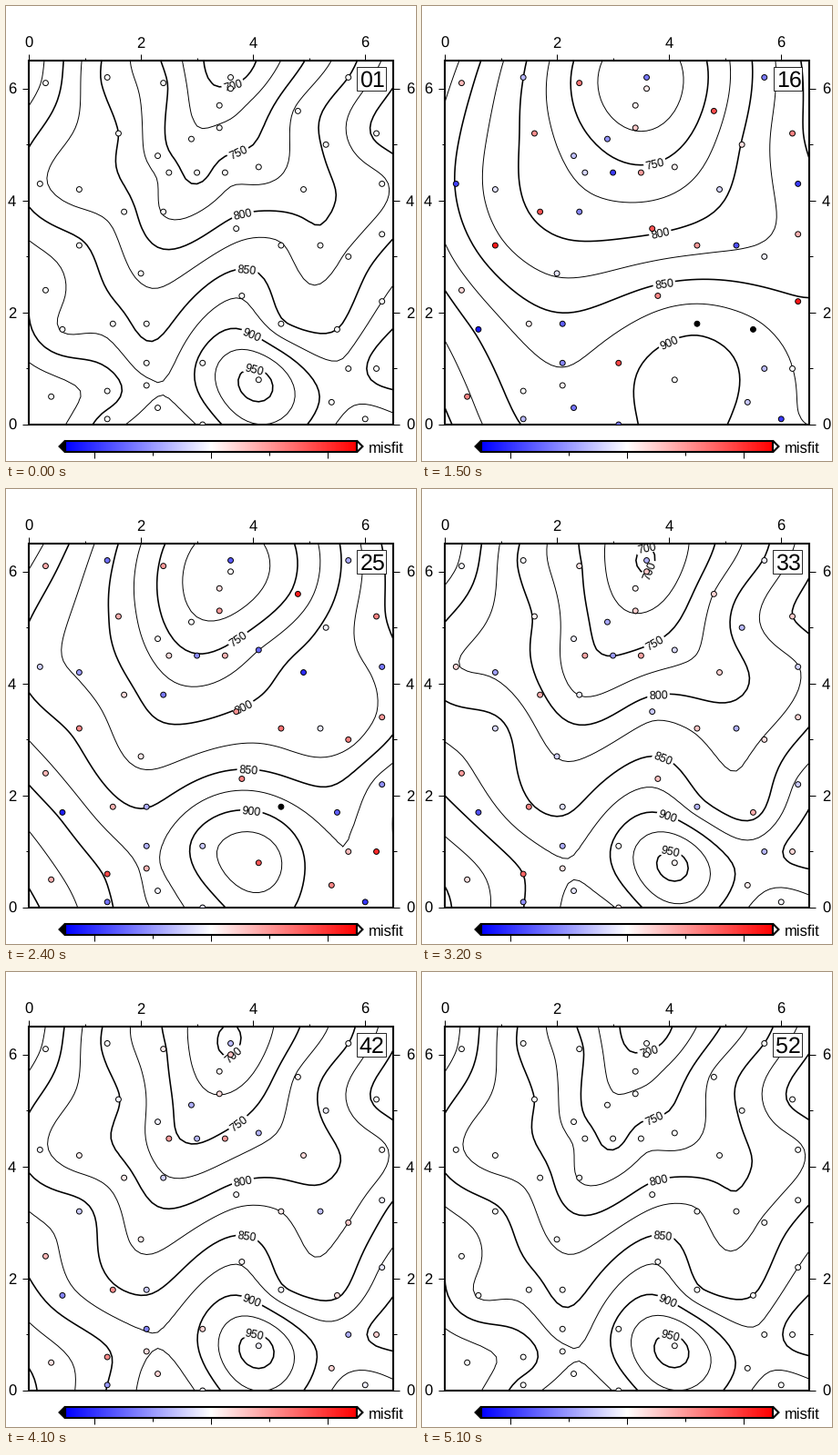
Write a matplotlib script that moves like this. It is 450 px wide and 500 px high and loops after 5200 ms.

```python
"""Spline surface through scattered heights, rebuilt from a growing number of eigenvalues."""
import numpy as np
import matplotlib.pyplot as plt
from matplotlib.animation import FuncAnimation
from matplotlib.colors import LinearSegmentedColormap
from matplotlib.patches import Polygon, Rectangle
from matplotlib.textpath import TextPath

plt.rcParams["font.family"] = "Liberation Sans"
plt.rcParams["text.hinting"] = "none"

W, H, DPI = 450, 500, 100
PT = 72 / DPI                                   # points per pixel
LEFT, TOP, SIDE, SPAN = 25, 60, 400, 6.5
BOTTOM = TOP + SIDE
MAX_MISFIT = 25

# Survey points: position and height
PX = np.array([
    0.3, 1.4, 2.4, 3.6, 5.7, 1.6, 2.9, 3.4, 3.4, 4.8, 5.3, 6.2, 0.2,
    0.9, 2.3, 2.5, 3.0, 3.5, 4.1, 4.9, 6.3, 0.9, 1.7, 2.4, 3.7, 4.5,
    5.2, 6.3, 0.3, 2.0, 3.8, 6.3, 0.6, 1.5, 2.1, 2.1, 3.1, 4.5, 5.5,
    5.7, 6.2, 0.4, 1.4, 1.4, 2.1, 2.3, 3.1, 4.1, 5.4, 6.0, 5.7, 3.6])
PY = np.array([
    6.1, 6.2, 6.1, 6.2, 6.2, 5.2, 5.1, 5.3, 5.7, 5.6, 5.0, 5.2, 4.3,
    4.2, 4.8, 4.5, 4.5, 4.5, 4.6, 4.2, 4.3, 3.2, 3.8, 3.8, 3.5, 3.2,
    3.2, 3.4, 2.4, 2.7, 2.3, 2.2, 1.7, 1.8, 1.8, 1.1, 1.1, 1.8, 1.7,
    1.0, 1.0, 0.5, 0.6, 0.1, 0.7, 0.3, 0.0, 0.8, 0.4, 0.1, 3.0, 6.0])
PZ = np.array([
    870, 793, 755, 690, 800, 800, 730, 728, 710, 780, 804, 855, 830,
    813, 762, 765, 740, 765, 760, 790, 820, 855, 812, 773, 812, 827,
    805, 840, 890, 820, 873, 875, 873, 865, 841, 862, 908, 855, 850,
    882, 910, 940, 915, 890, 880, 870, 880, 960, 890, 860, 830, 705])
COUNT = len(PZ)


def to_px(x, y):
    scale = SIDE / SPAN
    return LEFT + scale * np.asarray(x), BOTTOM - scale * np.asarray(y)


def green(x, y):
    """Minimum curvature Green's function from every (x, y) to every point."""
    r = np.hypot(x[:, None] - PX, y[:, None] - PY)
    return r**2 * (np.log(np.where(r > 0, r, 1)) - 1)


def design(x, y):
    return np.column_stack([np.ones_like(x), x, y])


# Plane plus spline
plane = np.linalg.lstsq(design(PX, PY), PZ, rcond=None)[0]
residual = PZ - design(PX, PY) @ plane
G_points = green(PX, PY)
eig, vec = np.linalg.eigh(G_points)
order = np.argsort(-np.abs(eig))
eig, vec = eig[order], vec[:, order]

axis = np.linspace(0, SPAN, 66)
gx, gy = np.meshgrid(axis, axis)
G_grid = green(gx.ravel(), gy.ravel())
grid_plane = design(gx.ravel(), gy.ravel()) @ plane
grid_px = to_px(gx, gy)


def solve(n):
    """Surface and misfit using the n largest eigenvalues."""
    weights = vec[:, :n] @ (vec[:, :n].T @ residual / eig[:n])
    surface = (G_grid @ weights + grid_plane).reshape(gx.shape)
    return surface, residual - G_points @ weights


fig = plt.figure(figsize=(W / DPI, H / DPI), dpi=DPI, facecolor="white")
ax = fig.add_axes([0, 0, 1, 1])
ax.set_xlim(0, W)
ax.set_ylim(H, 0)
ax.axis("off")

polar = LinearSegmentedColormap.from_list("polar", ["blue", "white", "red"], N=511)
polar.set_under("black")
polar.set_over("white")


def line(x0, y0, x1, y1):
    ax.plot([x0, x1], [y0, y1], color="black", lw=0.72, zorder=4,
            solid_capstyle="butt")


def draw_axes():
    for v in range(7):
        size = 3.5 if v % 2 else 7
        x, y = to_px(v, v)
        line(x, TOP, x, TOP - size)
        line(LEFT, y, LEFT - size, y)
        line(LEFT + SIDE, y, LEFT + SIDE + size, y)
        if v % 2 == 0:
            ax.text(x, 46.2, str(v), size=12, ha="center", va="baseline")
            ax.text(LEFT - 13.9, y + 5.9, str(v), size=12, ha="right", va="baseline")
            ax.text(LEFT + SIDE + 13.9, y + 5.9, str(v), size=12, ha="left",
                    va="baseline")


def draw_colorbar():
    x0, x1, y0, y1 = 65, 385, 477.6, 490.4
    mid = (y0 + y1) / 2
    ramp = np.linspace(-MAX_MISFIT, MAX_MISFIT, 320)[None]
    ax.imshow(ramp, cmap=polar, extent=(x0, x1, y1, y0), aspect="auto", zorder=1)
    style = dict(ec="black", lw=1.5, joinstyle="miter")
    ax.add_patch(Polygon([(x0, y0), (x0 - 6.4, mid), (x0, y1)], fc="black", **style))
    ax.add_patch(Polygon([(x1, y0), (x1 + 6.4, mid), (x1, y1)], fc="white", **style))
    ax.add_patch(Rectangle((x0, y0), x1 - x0, y1 - y0, fc="none", zorder=3, **style))
    for k in range(5):
        x = 97 + 64 * k
        line(x, y1, x, y1 + (3.5 if k % 2 else 7))
    ax.text(398.3, 490.5, "misfit", size=12, ha="left", va="baseline")


draw_axes()
draw_colorbar()
frame = ax.add_patch(Rectangle((LEFT, TOP), SIDE, SIDE, fc="none", ec="black",
                               lw=1.5, joinstyle="miter", zorder=5))
dots = ax.scatter(*to_px(PX, PY), c=np.zeros(COUNT), cmap=polar, vmin=-MAX_MISFIT,
                  vmax=MAX_MISFIT, s=(5.9 * PT)**2, edgecolors="black",
                  linewidths=0.7, zorder=6)
dots.set_clip_path(frame)
counter_box = ax.add_patch(Rectangle((0, 0), 1, 1, fc="white", ec="black",
                                     lw=0.6, zorder=7))
counter = ax.text(0, 88.7, "", size=18, ha="left", va="baseline", zorder=8)

LEVELS = np.arange(600, 1101, 25)
WIDTHS = [1.15 if v % 50 == 0 else 0.7 for v in LEVELS]
CUT_A = np.array(to_px(3.6, 6.5))
CUT_B = np.array(to_px(4.05, 0.75))
moving = []


def crossings(seg):
    """Places and angles where a contour meets the labelling line."""
    d = CUT_B - CUT_A
    rel = seg - CUT_A
    side = rel[:, 0] * d[1] - rel[:, 1] * d[0]
    for i in np.nonzero(side[:-1] * side[1:] < 0)[0]:
        p = seg[i] + (seg[i + 1] - seg[i]) * side[i] / (side[i] - side[i + 1])
        if 0 <= (p - CUT_A) @ d / (d @ d) <= 1:
            dx, dy = (seg[max(0, i - 5):i + 6] - p).T
            yield p, np.degrees(np.arctan2(-(dx @ dy), dx @ dx))


def add_label(p, angle, text):
    w, h = 24.6, 12.7
    gap = Rectangle((p[0] - w / 2, p[1] - h / 2), w, h, angle=-angle,
                    rotation_point="center", fc="white", ec="none", zorder=2)
    ax.add_patch(gap)
    label = ax.text(*p, text, size=9, rotation=angle, rotation_mode="anchor",
                    ha="center", va="center_baseline", zorder=3)
    for art in (gap, label):
        art.set_clip_path(frame)
        moving.append(art)


def set_counter(text):
    ink = TextPath((0, 0), text, size=25).get_extents()
    x = 387
    counter.set_text(text)
    counter.set_x(x + ink.x0)
    counter_box.set_bounds(x + ink.x0 - 3, 66.5, ink.width + 6, 26)


def update(i):
    while moving:
        moving.pop().remove()
    # A single eigenvalue stands for the full solution
    surface, misfit = solve(i + 1 if i else COUNT)
    contours = ax.contour(*grid_px, surface, levels=LEVELS, colors="black",
                          linewidths=WIDTHS, zorder=1)
    moving.append(contours)
    for level, segs in zip(LEVELS, contours.allsegs):
        if level % 50 == 0:
            for seg in segs:
                for p, angle in crossings(seg):
                    add_label(p, angle, str(level))
    dots.set_array(misfit)
    set_counter(f"{i + 1:02d}")
    return []


anim = FuncAnimation(fig, update, frames=COUNT, interval=100, repeat=True,
                     repeat_delay=0)
plt.show()
```
